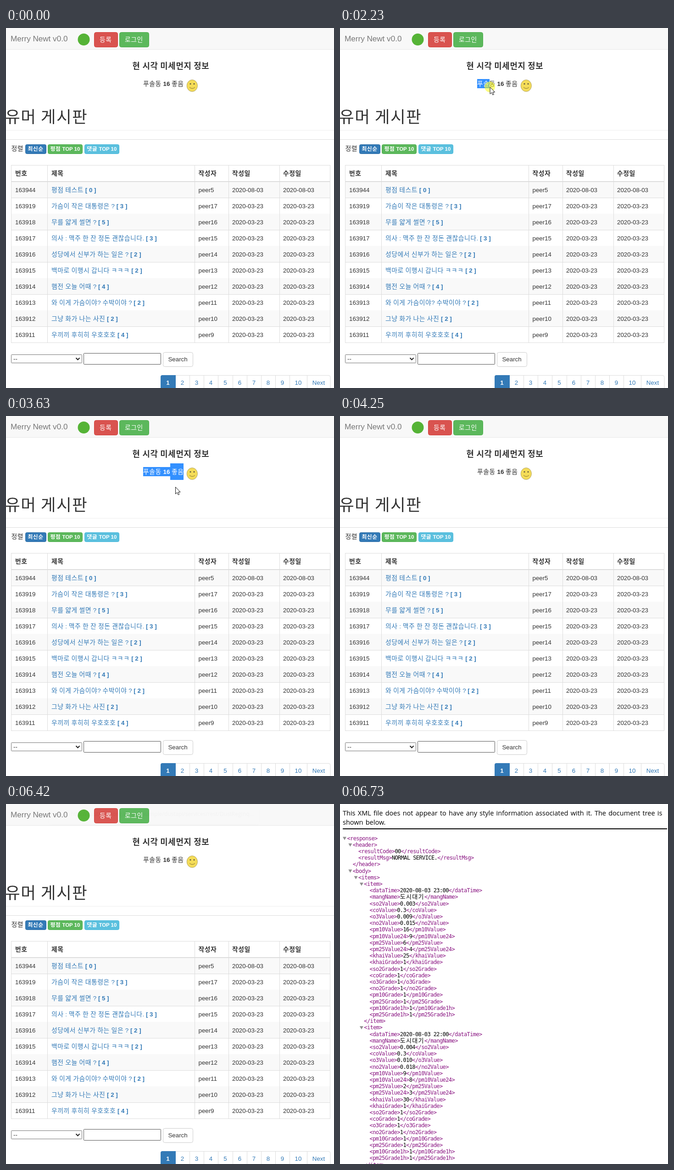
An HTML page for the animation above (8 s loop, 715 px wide and 783 px high).

```html
<!DOCTYPE html>
<html lang="ko">
<head>
<meta charset="utf-8">
<style>
html, body { margin: 0; width: 100%; height: 100%; overflow: hidden; background: #fff; }
svg { display: block; }
text { font: 13.3px 'Liberation Sans', 'Noto Sans CJK KR', 'Noto Sans CJK', sans-serif; fill: #333; white-space: pre; }
.k { font-size: 1.04em; letter-spacing: .04em; }
.b { font-weight: bold; }
.mid { text-anchor: middle; }
.link { fill: #337ab7; }
.white { fill: #fff; }
.small { font-size: 11.4px; }
.large { font-size: 17.1px; }
.huge { font-size: 34.2px; }
.brand { fill: #777; }
.ui { font: 12px 'Open Sans', 'Noto Sans', sans-serif; fill: #222; }
.note { font: 14.5px 'Open Sans', 'Noto Sans', sans-serif; word-spacing: 1.5px; fill: #000; }
.code { font: 12px 'DejaVu Sans Mono', 'Noto Sans CJK KR', 'Noto Sans CJK', monospace; letter-spacing: -.6px; fill: #000; }
.code .k { font-size: 13px; letter-spacing: 1.3px; }
.tag { fill: #881280; }
#popup { filter: drop-shadow(0 3px 4px rgba(0, 0, 0, .5)); }
</style>
</head>
<body>
<svg id="stage" width="715" height="783" viewBox="0 0 715 783"></svg>
<script>
const LOOP = 8000;
const stage = document.getElementById('stage');

const text = (x, y, s, cls = '') =>
  `<text x="${x}" y="${y}" class="${cls}">${s.replace(/[ㄱ-힝]+/g, '<tspan class="k">$&</tspan>')}</text>`;
const rect = (x, y, w, h, fill, extra = '') =>
  `<rect x="${x}" y="${y}" width="${w}" height="${h}" fill="${fill}" ${extra}/>`;
const path = (d, stroke, extra = 'fill="none"') => `<path d="${d}" stroke="${stroke}" ${extra}/>`;
const button = (x, y, w, h, fill, stroke, r) =>
  rect(x + .5, y + .5, w - 1, h - 1, fill, `stroke="${stroke}" rx="${r}"`);

const posts = [
  [163944, '평점 테스트', 0, 5], [163919, '가슴이 작은 대통령은 ?', 3, 17],
  [163918, '무를 얇게 썰면 ?', 5, 16], [163917, '의사 : 맥주 한 잔 정돈 괜찮습니다.', 3, 15],
  [163916, '성당에서 신부가 하는 일은 ?', 2, 14], [163915, '백마로 이행시 갑니다 ㅋㅋㅋ', 2, 13],
  [163914, '햄전 오늘 어때 ?', 4, 12], [163913, '와 이게 가슴이야? 수박이야 ?', 2, 11],
  [163912, '그냥 화가 나는 사진', 2, 10], [163911, '우끼끼 후히히 우호호호', 4, 9]
];
const dust = '푸솔동 <tspan class="b">16</tspan> 좋음';

function header() {
  return rect(0, 0, 715, 46, '#f8f8f8') + rect(0, 46, 715, 1, '#e7e7e7') +
    text(10, 28.5, 'Merry Newt v0.0', 'large brand') +
    '<circle cx="169.5" cy="25" r="13" fill="#55b336"/>' +
    button(192, 9, 52, 33, '#d9534f', '#d43f3a', 4) + text(204, 30, '등록', 'white') +
    button(247, 9, 65, 33, '#5cb85c', '#4cae4c', 4) + text(259, 30, '로그인', 'white') +
    text(359.5, 89, '현 시각 미세먼지 정보', 'b mid large') +
    text(299, 125.5, dust) +
    '<ellipse cx="405.8" cy="125.5" rx="11.6" ry="12.8" fill="#f4dc58" stroke="#b3a568"/>' +
    '<circle cx="402" cy="121.5" r="1.6" fill="#665c40"/><circle cx="410" cy="121.5" r="1.6" fill="#665c40"/>' +
    path('M400 129q6 5 12 0', '#8a7430') +
    text(-2, 206, '유머 게시판', 'huge') +
    rect(0, 222, 715, 1, '#eee') + rect(0, 242, 715, 1, '#ddd');
}

function table() {
  const cols = [11, 90, 411, 485, 596, 706];
  const heads = ['번호', '제목', '작성자', '작성일', '수정일'];
  const textX = [20, 99, 419.5, 493, 604];
  let s = text(11.5, 266.5, '정렬') +
    button(42, 253, 46, 21, '#337ab7', '#2e6da4', 3) + text(47.5, 267, '최신순', 'white small b') +
    button(91, 253, 76, 21, '#5cb85c', '#4cae4c', 3) + text(96.5, 267, '평점 TOP 10', 'white small b') +
    button(171, 253, 76, 21, '#5bc0de', '#46b8da', 3) + text(176.5, 267, '댓글 TOP 10', 'white small b');
  heads.forEach((h, i) => s += text(textX[i], 320.5, h, 'b'));
  posts.forEach(([id, title, replies, user], i) => {
    const y = 334 + 35 * i, base = y + 23, date = i ? '2020-03-23' : '2020-08-03';
    if (i % 2 == 0) s += rect(12, y, 695, 35, '#f9f9f9');
    s += rect(12, y + 35, 695, 1, '#ddd') + text(20, base, `${id}`) +
      text(99, base, `${title} <tspan class="b">[ ${replies} ]</tspan>`, 'link') +
      text(textX[2], base, `peer${user}`) + text(textX[3], base, date) + text(textX[4], base, date);
  });
  s += rect(11, 298, 696, 1, '#ddd') + rect(11, 333, 696, 2, '#ddd');
  cols.forEach(x => s += rect(x, 298, 1, 387, '#ddd'));
  return s;
}

function footer() {
  let s = button(11, 710, 155, 19, '#fff', '#767676', 1) + text(16, 724, '--') +
    path('M152.5 717.5l4 4 4-4', '#222', 'fill="none" stroke-width="2"') +
    button(169, 707, 169, 25, '#fff', '#555', 1) +
    button(342, 705, 66, 32, '#fff', '#ccc', 4) + text(353.5, 725, 'Search') +
    path('M337.5 790V759.5q0-4 4-4H703q4 0 4 4V790', '#ddd') +
    path('M337 790V759q0-4 4-4H370V790z', 'none', 'fill="#337ab7"') + text(353, 776, '1', 'white b mid');
  const edges = [369, 400, 431, 462, 494, 525, 556, 587, 618, 656, 707];
  edges.slice(1).forEach((x, i) => {
    if (i < 9) s += rect(x, 755, 1, 28, '#ddd');
    s += text((edges[i] + x) / 2, 776, i < 9 ? `${i + 2}` : 'Next', 'link mid');
  });
  return s;
}

function xmlPage() {
  const names = ('dataTime mangName so2Value coValue o3Value no2Value pm10Value pm10Value24 pm25Value pm25Value24 ' +
    'khaiValue khaiGrade so2Grade coGrade o3Grade no2Grade pm10Grade pm25Grade pm10Grade1h pm25Grade1h').split(' ');
  const items = [
    ['2020-08-03 23:00', '도시대기', '0.003', '0.3', '0.009', '0.015', 16, 9, 6, 4, 25],
    ['2020-08-03 22:00', '도시대기', '0.004', '0.3', '0.010', '0.018', 9, 8, 2, 3, 30]
  ];
  const tag = name => `<tspan class="tag">&lt;${name}&gt;</tspan>`;
  let s = rect(0, 0, 715, 783, '#fff') +
    text(6, 25, 'This XML file does not appear to have any style information associated with it. The document tree is', 'note') +
    text(6, 45, 'shown below.', 'note') + rect(6, 53, 707, 2, '#000');
  let row = 0;
  const line = (depth, content) => s += text(15.4 + 12.3 * depth, 78.5 + 14.2 * row++, content, 'code');
  const open = (depth, name) => {
    s += path(`M${6 + 12.3 * depth} ${71.5 + 14.2 * row}h8l-4 7z`, 'none', 'fill="#909090"');
    line(depth, tag(name));
  };
  const leaf = (depth, name, value) => line(depth, tag(name) + value + tag('/' + name));
  open(0, 'response');
  open(1, 'header');
  leaf(2, 'resultCode', '00');
  leaf(2, 'resultMsg', 'NORMAL SERVICE.');
  line(1, tag('/header'));
  open(1, 'body');
  open(2, 'items');
  for (const values of items) {
    open(3, 'item');
    names.forEach((name, i) => leaf(4, name, values[i] ?? 1));
    line(3, tag('/item'));
  }
  return s;
}

stage.innerHTML = `
  <clipPath id="clip">${rect(299, 103, 0, 36, '#000', 'id="clipBox"')}</clipPath>
  ${rect(0, 0, 715, 783, '#fff')}${header()}${table()}${footer()}
  <g id="selection">
    ${rect(299, 111, 0, 20, '#3390ff', 'id="low"')}${rect(358, 103, 0, 36, '#3390ff', 'id="tall"')}
    <g clip-path="url(#clip)">${text(299, 125.5, dust, 'white')}</g>
  </g>
  <g id="pointer">
    <circle id="press" r="11.5" fill="#ff0" opacity=".5"/>
    ${path('M.5 .5V15.5L4 12.3 6.3 17.5 8.7 16.5 6.5 11.4H11z', '#111', 'fill="#fff"')}
  </g>
  <g id="popup">
    ${rect(93, 3, 458, 41, '#fff', 'rx="5"')}
    <circle cx="114" cy="20.5" r="3.6" fill="none" stroke="#555" stroke-width="1.5"/>
    ${path('M116.8 23.3l4.2 4.2', '#555', 'stroke-width="1.7"')}
    ${text(141, 26, 'http://dustapi.mongarubel.example/dustapi/services/rest/DustRegInq...', 'ui')}
  </g>
  <g id="xml">${xmlPage()}</g>`;

const $ = id => document.getElementById(id);
const show = (id, on) => $(id).style.display = on ? '' : 'none';

// Pointer path: time, x, y
const route = [
  [910, 560, 735], [1070, 470, 450], [1220, 360, 200], [1370, 322, 142], [1520, 316, 135],
  [1600, 303, 118], [1680, 300, 122], [1830, 300, 123], [2630, 353, 133], [2780, 353, 133],
  [2850, 374, 133], [3000, 377, 133], [3160, 387, 133], [3470, 387, 133], [3630, 369, 154],
  [3940, 369, 154], [4250, 310, -20]
];
const charEdges = [299, 312, 326, 339, 343, 350, 357, 361, 374, 387];

function pointerAt(t) {
  const i = route.findIndex(p => p[0] > t);
  if (i < 1) return null;
  const [a, b] = [route[i - 1], route[i]], f = (t - a[0]) / (b[0] - a[0]);
  return [a[1] + (b[1] - a[1]) * f, a[2] + (b[2] - a[2]) * f];
}

function draw(t) {
  const pos = pointerAt(t);
  show('pointer', pos);
  if (pos) $('pointer').setAttribute('transform', `translate(${pos})`);
  show('press', (t >= 1830 && t < 3470) || (t >= 3780 && t < 3940));

  const selecting = t >= 1830 && t < 3780;
  show('selection', selecting);
  if (selecting) {
    const x = t < 3160 ? pos[0] : 387;
    const end = charEdges.reduce((a, b) => Math.abs(b - x) < Math.abs(a - x) ? b : a);
    $('low').setAttribute('width', Math.min(end, 358) - 299);
    $('tall').setAttribute('width', Math.max(end - 358, 0));
    $('clipBox').setAttribute('width', end - 299);
  }

  show('popup', t >= 5570 && t < 6490);
  $('popup').style.opacity = t < 5650 ? .88 : t < 6420 ? 1 : .02;
  show('xml', t >= 6570);
}

const start = performance.now();
function tick() {
  draw((performance.now() - start) % LOOP);
  requestAnimationFrame(tick);
}
tick();
</script>
</body>
</html>
```
